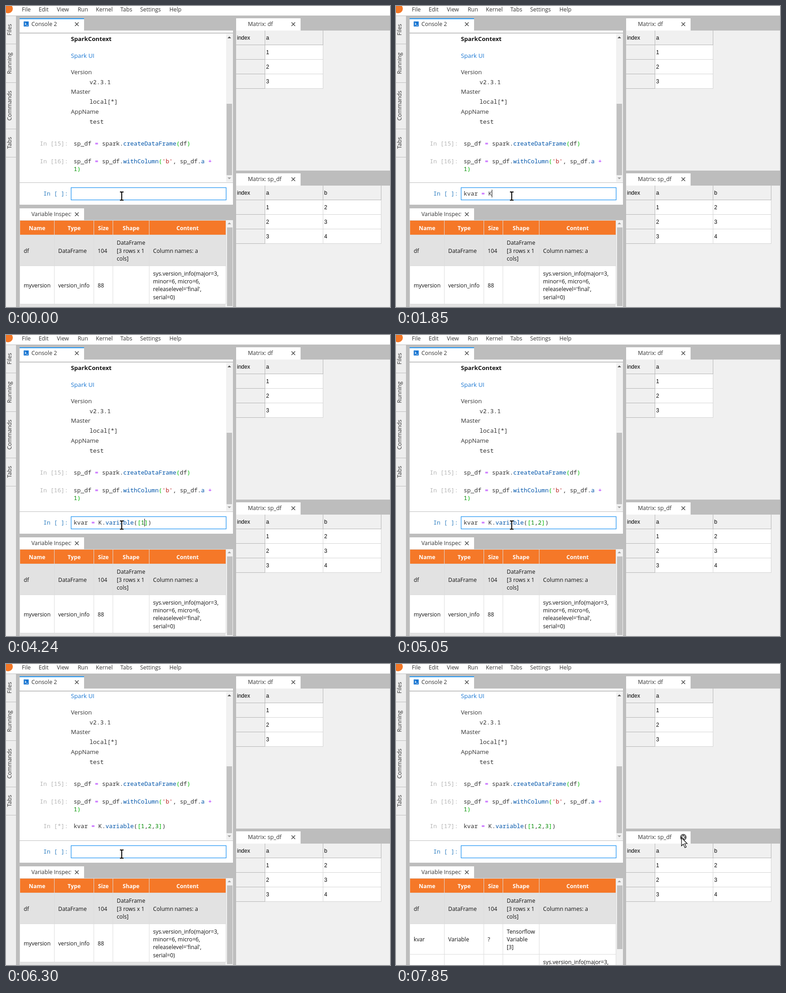
An HTML page with a canvas that plays this animation: 846x662 px, repeating every 8 s.

```html
<!DOCTYPE html>
<html lang="en">
<head>
<meta charset="utf-8">
<title>Variable inspector</title>
<style>
html, body { margin: 0; width: 100%; height: 100%; overflow: hidden; background: #bdbdbd; }
canvas { display: block; }
</style>
</head>
<body>
<canvas id="stage" width="846" height="662"></canvas>
<script>
const ctx = document.getElementById('stage').getContext('2d');
const LOOP = 8000;
const RUN = 6300, DONE = 6890;
const PITCH = 7.8;
const SANS = '"Open Sans", "Noto Sans", sans-serif';
const MONO = '13px "Noto Sans Mono", "DejaVu Sans Mono", monospace';
const GRID = '12px "Liberation Sans", sans-serif';
const UI = '12.3px ' + SANS;
const CELL = '12.2px ' + SANS;
const RICH = '13.2px ' + SANS;
const INK = '#333', BLUE = '#2196f3', RULE = '#dcdcdc';

function rect(x, y, w, h, color) {
  ctx.fillStyle = color;
  ctx.fillRect(x, y, w, h);
}

function text(s, x, y, font, color = INK, align = 'left') {
  ctx.font = font;
  ctx.fillStyle = color;
  ctx.textAlign = align;
  ctx.fillText(s, x, y);
}

function clip(x, y, w, h, draw) {
  ctx.save();
  ctx.beginPath();
  ctx.rect(x, y, w, h);
  ctx.clip();
  draw();
  ctx.restore();
}

function disc(x, y, r, color) {
  ctx.fillStyle = color;
  ctx.beginPath();
  ctx.arc(x, y, r, 0, Math.PI * 2);
  ctx.fill();
}

function line(points, color, width) {
  ctx.beginPath();
  points.forEach(([x, y]) => ctx.lineTo(x, y));
  ctx.strokeStyle = color;
  ctx.lineWidth = width;
  ctx.stroke();
}

function cross(x, y, color = '#444', r = 4) {
  line([[x - r, y - r], [x + r, y + r]], color, 1.4);
  line([[x + r, y - r], [x - r, y + r]], color, 1.4);
}

function triangle(x, y, dir, color) {
  ctx.fillStyle = color;
  ctx.beginPath();
  ctx.moveTo(x - 4, y + 2 * dir);
  ctx.lineTo(x + 4, y + 2 * dir);
  ctx.lineTo(x, y - 2 * dir);
  ctx.fill();
}

// Highlighted code; characters in `lit` are matched brackets.
function code(s, x, y, lit = '') {
  let prev = '';
  for (const m of s.matchAll(/'[^']*'|\w+|\s+|./g)) {
    const tok = m[0];
    let color = INK;
    if (tok[0] === "'") color = '#ba2121';
    else if (/^\d/.test(tok)) color = '#080';
    else if (/^\w/.test(tok) && prev === '.') color = '#05a';
    else if (/[=+]/.test(tok)) color = '#a2f';
    else if (lit.includes(tok)) color = '#0b0';
    text(tok, x + m.index * PITCH, y, MONO, color);
    prev = tok;
  }
}

function prompt(label, y, color = '#b5b5b5') {
  text(`In [${label}]:`, 136.8, y, MONO, color, 'right');
}

function tab(x, y, label) {
  rect(x, y, 142, 27, '#fff');
  clip(x, y, 114, 26, () => text(label, x + 26, y + 17, UI));
  cross(x + 126, y + 13);
}

function menuBar() {
  rect(0, 0, 846, 21, '#fff');
  disc(5, 6, 10, '#f37726');
  const items = [['File', 35], ['Edit', 72], ['View', 112], ['Run', 158], ['Kernel', 198],
    ['Tabs', 252], ['Settings', 295.5], ['Help', 360]];
  for (const [s, x] of items) text(s, x, 12, UI);
}

function sideBar() {
  rect(0, 21, 23, 641, '#eee');
  rect(22, 21, 1, 641, '#bdbdbd');
  rect(0, 21, 23, 1, '#bdbdbd');
  for (const y of [83, 168, 270, 332]) rect(0, y, 22, 1, '#bdbdbd');
  for (const [s, y] of [['Files', 52], ['Running', 126], ['Commands', 219], ['Tabs', 301]]) {
    ctx.save();
    ctx.translate(12, y);
    ctx.rotate(-Math.PI / 2);
    text(s, 0, 0, UI, INK, 'center');
    ctx.restore();
  }
}

function history(t) {
  const dy = t < RUN ? 0 : -39;
  text('SparkContext', 143, 77 + dy, 'bold ' + RICH, '#111');
  text('Spark UI', 143, 114 + dy, RICH, '#1976d2');
  [['Version', 'v2.3.1'], ['Master', 'local[*]'], ['AppName', 'test']].forEach(([k, v], i) => {
    const y = 149.5 + i * 43.7 + dy;
    text(k, 143, y, RICH);
    text(v, 184, y + 22, MONO);
  });
  prompt('15', 307 + dy);
  code('sp_df = spark.createDataFrame(df)', 149, 307 + dy, '()');
  prompt('16', 346 + dy);
  code("sp_df = sp_df.withColumn('b', sp_df.a +", 149, 346 + dy, '()');
  code('1)', 149, 362.5 + dy, '()');
  if (t >= RUN) {
    prompt(t < DONE ? '*' : '17', 361);
    code('kvar = K.variable([1,2,3])', 149, 361, '[]');
  }
}

const LINE = 'kvar = K.variable([1,2,3';
// Each burst: start, end, number of key presses, characters per press.
const BURSTS = [[710, 710, 1, 1], [980, 1850, 7, 1], [2280, 3260, 8, 1], [3410, 3530, 2, 1],
  [3840, 3840, 1, 1], [4240, 4240, 1, 1], [4520, 4520, 1, 2], [5245, 5440, 2, 1]];

function typedCount(t) {
  let n = 0;
  for (const [from, to, keys, size] of BURSTS) {
    if (t < from) break;
    const gap = keys > 1 ? (to - from) / (keys - 1) : 1;
    n += size * Math.min(keys, Math.floor((t - from) / gap + 0.001) + 1);
  }
  return n;
}

function inputCell(t) {
  prompt(' ', 417, '#307fc1');
  ctx.strokeStyle = BLUE;
  ctx.lineWidth = 1.3;
  ctx.strokeRect(143.5, 399.5, 341.5, 27);
  if (t >= RUN) return;
  const n = typedCount(t);
  const tail = n > 18 ? '])' : n === 18 ? ')' : '';
  code(LINE.slice(0, n) + tail, 149, 417, n > 18 ? '[]' : '()');
  const caret = (t >= 560 && t < 5050) || (t >= 5245 && t < 6030);
  if (caret) rect(Math.round(149 + n * PITCH), 404, 1, 17, '#000');
}

function consolePanel(t) {
  rect(30, 54, 470, 383, '#fff');
  tab(30, 27, 'Console 2');
  rect(30, 27, 142, 2, BLUE);
  rect(39, 34, 11, 11, '#1976d2');
  line([[41.5, 37], [44, 39.5], [41.5, 42]], '#fff', 1.2);
  line([[45, 42.5], [48, 42.5]], '#fff', 1);
  rect(30, 59, 470, 1, '#8c8c8c');
  clip(30, 61, 455, 326, () => history(t));
  rect(485, 61, 15, 326, '#f1f1f1');
  const top = t < RUN ? 215 : 225;
  rect(486, top, 12, 372 - top, '#c1c1c1');
  triangle(492, 69, 1, '#505050');
  triangle(492, 379, -1, '#a3a3a3');
  rect(30, 388, 470, 1, '#bdbdbd');
  inputCell(t);
}

const COLS = [30, 106, 193, 235, 315, 484];
const VERSION = ['sys.version_info(major=3,', 'minor=6, micro=6,', "releaselevel='final',", 'serial=0)'];

function cellRules(y, h) {
  rect(30, y + h - 1, 454, 1, RULE);
  for (const x of COLS) rect(x, y, 1, h, RULE);
}

function row(y, h, fill, cells) {
  rect(30, y, 454, h, fill);
  cellRules(y, h);
  cells.forEach((cell, i) => {
    const lines = [].concat(cell);
    const first = y + h / 2 + 4.6 - (lines.length - 1) * 8.65;
    lines.forEach((s, k) => text(s, COLS[i] + 9, first + k * 17.3, CELL, '#111'));
  });
}

function inspector(t) {
  tab(30, 445, 'Variable Inspector');
  rect(30, 471, 470, 191, '#fff');
  rect(30, 471, 454, 33, '#f57828');
  rect(30, 471, 454, 1, RULE);
  cellRules(471, 33);
  ['Name', 'Type', 'Size', 'Shape', 'Content'].forEach((s, i) => {
    text(s, (COLS[i] + COLS[i + 1]) / 2 + 0.5, 493, 'bold ' + CELL, '#fff', 'center');
  });
  row(504, 68, '#e2e2e2', ['df', 'DataFrame', '104', ['DataFrame', '[3 rows x 1', 'cols]'], 'Column names: a']);
  const version = ['myversion', 'version_info', '88', '', VERSION];
  if (t < DONE) {
    row(572, 84, '#fff', version);
    rect(30, 656, 454, 6, '#e2e2e2');
  } else {
    row(572, 67, '#fff', ['kvar', 'Variable', '?', ['Tensorflow', 'Variable', '[3]'], '']);
    row(639, 85, '#fff', version);
  }
  rect(485, 471, 15, 191, '#f1f1f1');
  triangle(492, 478, 1, '#a3a3a3');
  rect(487, 487, 12, t < DONE ? 173 : 140, '#c1c1c1');
}

function matrix(y, h, label, names, data) {
  const top = y + 27, right = 571 + 128 * names.length;
  rect(507, top, 339, h - 27, '#f0f0f0');
  tab(507, y, label);
  rect(571, top + 32, right - 571, 96, '#fff');
  text('index', 509, top + 20, GRID, '#000');
  names.forEach((s, i) => text(s, 573 + i * 128, top + 20, GRID, '#000'));
  data.forEach((r, k) => r.forEach((v, i) => text(v, 573 + i * 128, top + 52 + k * 32, GRID, '#000')));
  for (let k = 0; k < 4; k++) {
    const ly = top + 31 + k * 32;
    rect(507, ly, 64, 1, '#b4b4b4');
    rect(571, ly, right - 571, 1, k ? '#d4d4d4' : '#b4b4b4');
  }
  rect(570, top, 1, 128, '#b4b4b4');
  names.forEach((_, i) => {
    const x = 698 + i * 128;
    rect(x, top, 1, 32, '#b4b4b4');
    rect(x, top + 32, 1, 96, '#d4d4d4');
  });
}

function pointerAt(t) {
  if (t < DONE) return [255, 418];
  if (t < 7010) return [288, 407];
  const p = Math.min(1, Math.floor((t - 7010) / 140) / 6);
  const e = p * p * (3 - 2 * p);
  return [336 + 293 * e, 392 - 10 * e];
}

function beam(x, y) {
  const shape = [
    [[x - 4, y - 9], [x - 1, y - 9], [x, y - 8], [x + 1, y - 9], [x + 4, y - 9]],
    [[x, y - 8], [x, y + 8]],
    [[x - 4, y + 9], [x - 1, y + 9], [x, y + 8], [x + 1, y + 9], [x + 4, y + 9]]
  ];
  for (const s of shape) line(s, '#fff', 4);
  for (const s of shape) line(s, '#000', 2);
}

function arrow(x, y) {
  ctx.beginPath();
  for (const [dx, dy] of [[0, 0], [0, 18], [4, 14], [7.5, 22], [10.5, 20.5], [7, 13], [12.5, 13]]) ctx.lineTo(x + dx, y + dy);
  ctx.closePath();
  ctx.fillStyle = '#fff';
  ctx.fill();
  ctx.strokeStyle = '#000';
  ctx.lineWidth = 1.2;
  ctx.stroke();
}

function pointer(t) {
  const [x, y] = pointerAt(t);
  if (x > 625) {
    disc(633, 381, 7.2, '#616161');
    cross(633, 381, '#fff', 3.5);
  }
  if (x < 500) beam(x, y);
  else arrow(x, y);
}

function draw(t) {
  rect(0, 0, 846, 662, '#bdbdbd');
  menuBar();
  sideBar();
  consolePanel(t);
  inspector(t);
  matrix(27, 335, 'Matrix: df', ['a'], [[1], [2], [3]]);
  matrix(368, 294, 'Matrix: sp_df', ['a', 'b'], [[1, 2], [2, 3], [3, 4]]);
  pointer(t);
}

const start = performance.now();
function tick() {
  draw((performance.now() - start) % LOOP);
  requestAnimationFrame(tick);
}
tick();
</script>
</body>
</html>
```
